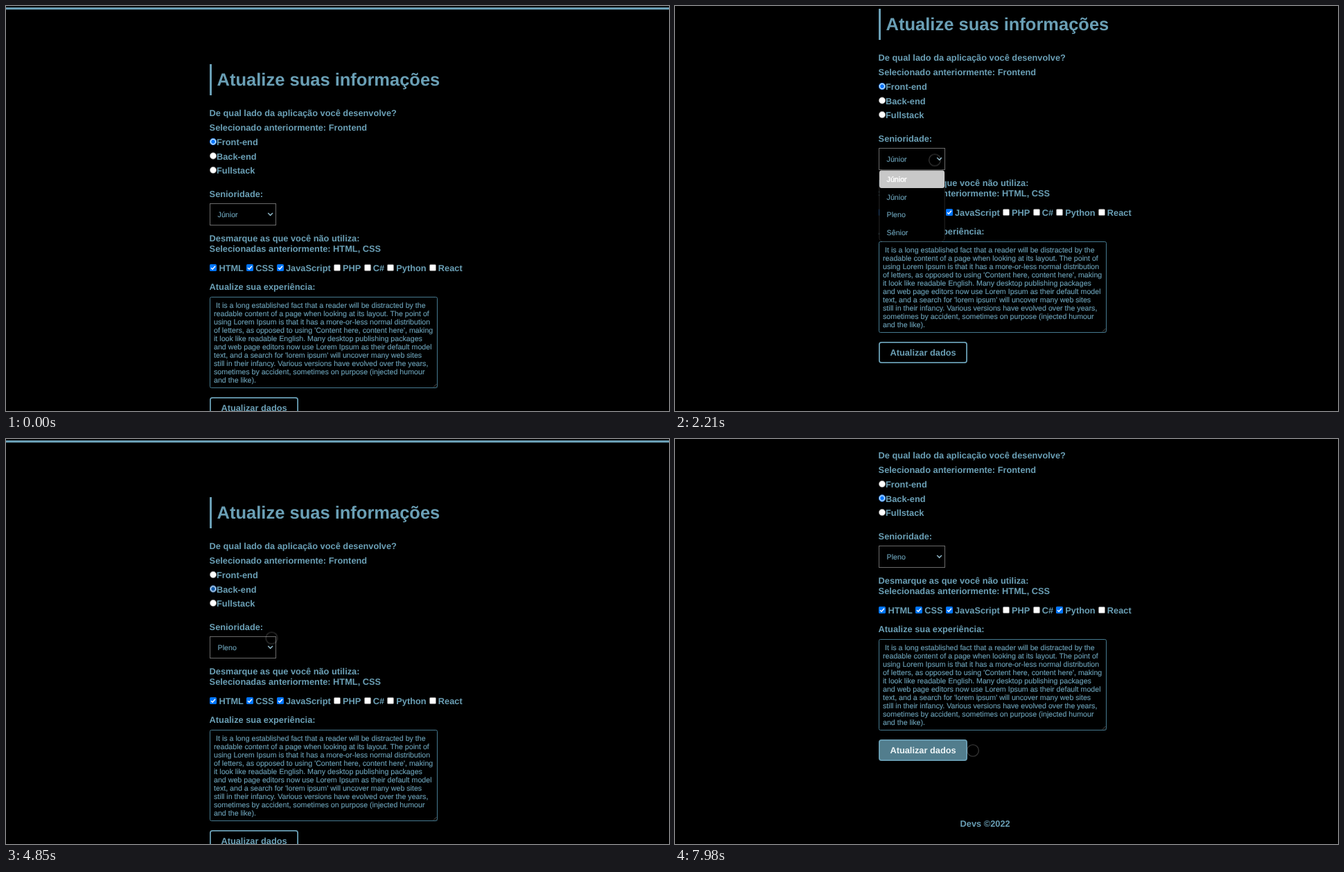
Write an HTML page that moves like this. It is 957x585 px and loops after 8000 ms.

```html
<!DOCTYPE html>
<html lang="pt-BR">
<head>
<meta charset="utf-8">
<title>Atualize suas informações</title>
<style>
html, body { margin: 0; width: 100%; height: 100%; overflow: hidden; background: #000; }
svg { display: block; width: 100%; height: 100%; }
text {
  font: bold 12.8px "Liberation Sans", Arial, sans-serif;
  fill: #6a9fb5;
  text-rendering: geometricPrecision;
}
.title { font-size: 25.5px; }
.small text, text.small { font-weight: normal; font-size: 10.667px; stroke: #6a9fb5; stroke-width: .15px; }
.accent { fill: #6a9fb5; }
.control { color: #0075ff; }

/* everything shares one 8 s clock */
.page, .cursor, .step, .button, .button-text { animation: 8s ease-in-out infinite; }
.step { animation-timing-function: step-end; }

.page { animation-name: scroll; }
@keyframes scroll {
  0%, 18.75% { transform: translateY(0); }
  21.875%, 45% { transform: translateY(-80px); }
  47.5%, 81.49% { transform: translateY(0); }
  81.5%, 82.125% { transform: translateY(-1px); }
  86.25%, 100% { transform: translateY(-131px); }
}

.cursor { animation-name: move; }
@keyframes move {
  0%, 2.75% { transform: translate(834px, 522px); }
  9.625%, 12.375% { transform: translate(359px, 286px); }
  15.875%, 18.75% { transform: translate(431.5px, 224.5px); }
  26.25%, 29% { transform: translate(375px, 222.5px); }
  33.125%, 34.5% { transform: translate(350px, 301px); }
  38.875%, 40.5% { transform: translate(391px, 392px); }
  43.125%, 44.75% { transform: translate(391px, 309px); }
  50.375%, 50.75% { transform: translate(381px, 290px); }
  53.25%, 57.875% { transform: translate(325px, 217px); }
  60.625%, 61.25% { transform: translate(383.5px, 287.5px); }
  67.25%, 68.625% { transform: translate(479px, 389px); }
  73.125%, 75.625% { transform: translate(556px, 379px); }
  78.625%, 79.125% { transform: translate(562px, 401px); }
  79.5%, 82.125% { transform: translate(579px, 423px); }
  91.375%, 94.5% { transform: translate(551px, 252px); }
  98% { transform: translate(404px, 460px); }
  99.75%, 100% { transform: translate(430px, 450px); }
}

.seen { animation-name: seen; }
@keyframes seen { 0% { opacity: 0; } 2.75%, 100% { opacity: 1; } }

.list { animation-name: list; }
@keyframes list { 0% { opacity: 0; } 26.625% { opacity: 1; } 34%, 100% { opacity: 0; } }
.hot1 { animation-name: hot1; }
@keyframes hot1 { 0% { opacity: 1; } 30.4%, 100% { opacity: 0; } }
.hot2 { animation-name: hot2; }
@keyframes hot2 { 0% { opacity: 0; } 30.4% { opacity: 1; } 32%, 100% { opacity: 0; } }
.hot3 { animation-name: hot3; }
@keyframes hot3 { 0% { opacity: 0; } 32%, 100% { opacity: 1; } }
.hot rect { fill: #c8c8c8; }
.hot text { fill: #fff; stroke: #fff; stroke-width: .4px; }

.junior { animation-name: junior; }
@keyframes junior { 0% { opacity: 1; } 34%, 100% { opacity: 0; } }
.pleno { animation-name: pleno; }
@keyframes pleno { 0% { opacity: 0; } 34%, 100% { opacity: 1; } }
.focus { animation-name: focus; }
@keyframes focus { 0% { opacity: 0; } 34% { opacity: 1; } 53.75%, 100% { opacity: 0; } }

.front { animation-name: front; }
@keyframes front { 0% { opacity: 1; } 53.75%, 100% { opacity: 0; } }
.back { animation-name: back; }
@keyframes back {
  0% { opacity: 0; color: #0075ff; }
  53.75% { opacity: 1; color: #0075ff; }
  58% { opacity: 1; color: #0a55a4; }
  69%, 100% { opacity: 1; color: #0075ff; }
}
.python { animation-name: python; }
@keyframes python {
  0% { opacity: 0; color: #005cc8; }
  74.5% { opacity: 1; color: #005cc8; }
  82.2%, 100% { opacity: 1; color: #0075ff; }
}

.button { animation-name: fill; fill: #000; }
@keyframes fill { 0%, 97.25% { fill: #000; } 99.5%, 100% { fill: #527d8d; } }
.button-text { animation-name: ink; }
@keyframes ink { 0%, 97.25% { fill: #6a9fb5; } 99.5%, 100% { fill: #edf4f6; } }
</style>
</head>
<body>
<svg viewBox="0 0 957 585" preserveAspectRatio="none">
  <defs>
    <g id="radio"><circle r="4.7" fill="#fff" stroke="#767676" stroke-width=".7"/></g>
    <g id="radio-on">
      <circle r="4.5" fill="#fff" stroke="currentColor"/>
      <circle r="2.9" fill="currentColor"/>
    </g>
    <g id="box"><rect x=".4" y=".4" width="9.2" height="9.2" rx="1.5" fill="#fff" stroke="#767676" stroke-width=".8"/></g>
    <g id="box-on">
      <rect width="10" height="10" rx="1.6" fill="currentColor"/>
      <path d="M2 5.2 4.1 7.2 8 2.7" fill="none" stroke="#fff" stroke-width="1.5"/>
    </g>
  </defs>

  <g class="page">
    <rect class="accent" y="2" width="957" height="3.2"/>
    <rect class="accent" x="294" y="84" width="3" height="45"/>
    <text class="title" x="304.6" y="115">Atualize suas informações</text>

    <text x="293.6" y="159">De qual lado da aplicação você desenvolve?</text>
    <text x="293.6" y="180">Selecionado anteriormente: Frontend</text>
    <g class="control">
      <use href="#radio" x="299" y="196"/>
      <use href="#radio" x="299" y="216.5"/>
      <use href="#radio" x="299" y="237"/>
      <use class="step front" href="#radio-on" x="299" y="196"/>
      <use class="step back" href="#radio-on" x="299" y="216.5"/>
    </g>
    <text x="304" y="201">Front-end</text>
    <text x="304" y="222">Back-end</text>
    <text x="304" y="242">Fullstack</text>

    <text x="293.6" y="276">Senioridade:</text>
    <rect x="294.5" y="285.5" width="95" height="31" fill="#000" stroke="#6a6a6a"/>
    <rect class="step focus" x="293.6" y="285.6" width="96.8" height="31.6" rx="2.5" fill="#000" stroke="#fff" stroke-width="1.2"/>
    <text class="small step junior" x="305.6" y="305">Júnior</text>
    <text class="small step pleno" x="305.6" y="305">Pleno</text>
    <path d="M378.2 299 381.6 302.4 385 299" fill="none" stroke="#8db4c4" stroke-width="1.5"/>

    <text x="293.6" y="340">Desmarque as que você não utiliza:</text>
    <text x="293.6" y="355">Selecionadas anteriormente: HTML, CSS</text>

    <g class="control">
      <use href="#box-on" x="294" y="373"/>
      <use href="#box-on" x="347" y="373"/>
      <use href="#box-on" x="391" y="373"/>
      <use href="#box" x="473" y="373"/>
      <use href="#box" x="517" y="373"/>
      <use href="#box" x="550" y="373"/>
      <use class="step python" href="#box-on" x="550" y="373"/>
      <use href="#box" x="611" y="373"/>
    </g>
    <text x="307.4" y="383">HTML</text>
    <text x="360.3" y="383">CSS</text>
    <text x="404" y="383">JavaScript</text>
    <text x="486" y="383">PHP</text>
    <text x="529.7" y="383">C#</text>
    <text x="563.3" y="383">Python</text>
    <text x="623.8" y="383">React</text>

    <text x="293.6" y="410">Atualize sua experiência:</text>
    <rect x="294.5" y="420.5" width="328" height="131" rx="2" fill="none" stroke="#467a90"/>
    <path d="M617 550.5 621.5 546M620 550.5 621.5 549" stroke="#777" stroke-width=".7"/>
    <g class="small">
      <text x="303" y="436">It is a long established fact that a reader will be distracted by the</text>
      <text x="300" y="448">readable content of a page when looking at its layout. The point of</text>
      <text x="300" y="460">using Lorem Ipsum is that it has a more-or-less normal distribution</text>
      <text x="300" y="472">of letters, as opposed to using 'Content here, content here', making</text>
      <text x="300" y="484">it look like readable English. Many desktop publishing packages</text>
      <text x="300" y="496">and web page editors now use Lorem Ipsum as their default model</text>
      <text x="300" y="508">text, and a search for 'lorem ipsum' will uncover many web sites</text>
      <text x="300" y="520">still in their infancy. Various versions have evolved over the years,</text>
      <text x="300" y="532">sometimes by accident, sometimes on purpose (injected humour</text>
      <text x="300" y="544">and the like).</text>
    </g>

    <rect class="button" x="294.9" y="565.9" width="126.2" height="29.2" rx="3.2" stroke="#6a9fb5" stroke-width="1.8"/>
    <text class="button-text" x="310.4" y="584.5">Atualizar dados</text>
    <text x="411.6" y="691">Devs ©2022</text>

    <g class="step list small">
      <rect x="294.8" y="317" width="94.4" height="103" rx="5" fill="#000" stroke="#2a2a2a" stroke-width=".9"/>
      <text x="305.6" y="334.4">Júnior</text>
      <text x="305.6" y="360">Júnior</text>
      <text x="305.6" y="385.4">Pleno</text>
      <text x="305.6" y="411">Sênior</text>
      <g class="hot">
        <g class="step hot1"><rect x="295" y="317.4" width="94" height="25.6" rx="3"/><text x="305.6" y="334.4">Júnior</text></g>
        <g class="step hot2"><rect x="295" y="343" width="94" height="25.6"/><text x="305.6" y="360">Júnior</text></g>
        <g class="step hot3"><rect x="295" y="368.6" width="94" height="25.6"/><text x="305.6" y="385.4">Pleno</text></g>
      </g>
    </g>
  </g>

  <g class="step seen">
    <circle class="cursor" r="8.4" fill="none" stroke="#fff" stroke-opacity=".2" stroke-width="1.4"/>
  </g>
</svg>
</body>
</html>
```
